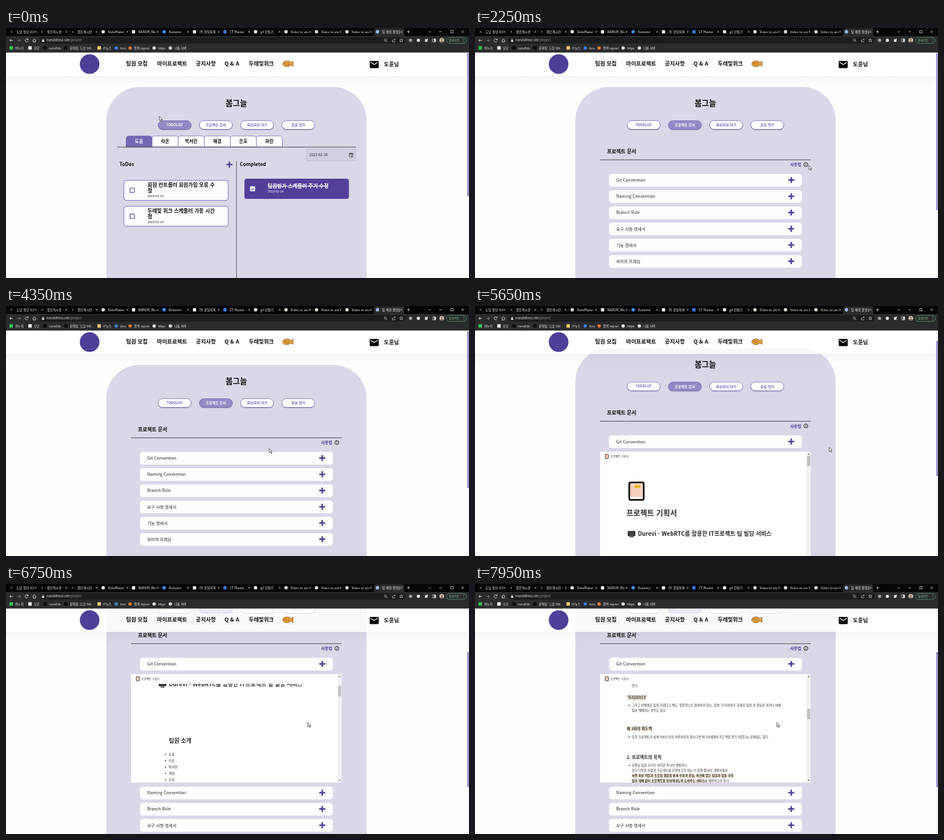
Animation, 800 px wide and 433 px high, one loop 8000 ms. Source, as an HTML page:

```html
<!DOCTYPE html>
<html lang="ko">
<head>
<meta charset="utf-8">
<title>두레빛</title>
<style>
  html, body { margin: 0; width: 100%; height: 100%; overflow: hidden; background: #fefefe; }
  svg { display: block; width: 100%; height: 100%; }
  text { font-family: 'Noto Sans CJK KR', 'Noto Sans CJK', 'Noto Sans', sans-serif; white-space: pre; }
</style>
</head>
<body>
<svg id="stage" viewBox="0 0 800 433" xmlns="http://www.w3.org/2000/svg"></svg>
<script>
const LOOP = 8000;
const PURPLE = '#503f99', EDGE = '#7766b8', INK = '#0c0c0c', DOC = '#2b2926';
const stage = document.getElementById('stage');

// Markup helpers; text y is the optical centre of the line
const text = (x, y, s, size, fill = INK, weight = 700, more = '') =>
  `<text x="${x}" y="${(y + size * 0.37).toFixed(2)}" font-size="${size}" fill="${fill}" font-weight="${weight}" ${more}>${s}</text>`;
const mid = (x, y, s, size, fill, weight) => text(x, y, s, size, fill, weight, 'text-anchor="middle"');
const rect = (x, y, w, h, fill, r = 0, more = '') =>
  `<rect x="${x}" y="${y}" width="${w}" height="${h}" rx="${r}" fill="${fill}" ${more}/>`;
const dot = (x, y, r, fill, more = '') => `<circle cx="${x}" cy="${y}" r="${r}" fill="${fill}" ${more}/>`;
const line = (d, stroke, w = 1, more = '') => `<path d="${d}" fill="none" stroke="${stroke}" stroke-width="${w}" ${more}/>`;
const group = (id, body, more = '') => `<g id="${id}" ${more}>${body}</g>`;
const plus = (x, y, r, w) => line(`M${x - r} ${y}h${2 * r}M${x} ${y - r}v${2 * r}`, PURPLE, w);
const mark = s => `<tspan class="hl" font-weight="700">${s}</tspan>`;

function pill(x, label, on) {
  return rect(x - 28.5, 160.5, 57, 15, on ? '#9688c6' : '#fff', 7.5, `stroke="${EDGE}" stroke-width=".8" filter="url(#soft)"`) +
    mid(x, 168, label, label === 'TODOLIST' ? 5.7 : 6, on ? '#fff' : '#7465b3', 700);
}

function pills(active) {
  return ['TODOLIST', '프로젝트 문서', '화상회의 하기', '동료 평가']
    .map((s, i) => pill(291.5 + i * 71.2, s, i === active)).join('');
}

function todoCard(y, first) {
  return rect(203.7, y, 180.3, 34.5, '#fdfcff', 4, `stroke="${EDGE}"`) +
    rect(214.3, y + 13.3, 7.6, 7.6, 'none', 1, `stroke="${PURPLE}" stroke-width="1.1"`) +
    text(244.5, y + 8, first, 8.9) + text(244.5, y + 17.6, '정', 8.9) +
    text(244.5, y + 27.3, '2023-02-24', 5.4, '#222', 500);
}

function todoView() {
  const tabs = ['도윤', '라온', '박서한', '재겸', '은호', '하린'].map((s, i) => {
    const x = 207.5 + i * 45;
    return `<path d="M${x} 206v-14q0-5 5-5h35q5 0 5 5v14z" fill="${i ? '#fff' : '#7767b4'}" stroke="${EDGE}" stroke-width=".8"/>` +
      mid(x + 22.5, 196, s, 7.8, i ? INK : '#fff');
  }).join('');
  return pills(0) + tabs + line('M192 206.2H605', '#333', .9) +
    rect(519.5, 210, 84.5, 20, '#d3cee2', 0, 'stroke="#b7b1c8" stroke-width=".8"') +
    text(524, 220, '2023-02-24', 6.2, '#222', 500) +
    rect(593, 217.3, 6.4, 6, 'none', .6, 'stroke="#444" stroke-width=".9"') +
    line('M593 218.5h6.4M594.6 216v2M597.8 216v2', '#444', 1) + rect(596.3, 220.6, 2, 1.8, '#444') +
    text(196, 235.5, 'ToDos', 8.4) + plus(386, 236.5, 5.2, 2.4) +
    line('M398.3 230.5V433', '#444', .9) + text(404, 235.5, 'Completed', 8.4) +
    todoCard(264, '회원 컨트롤러 회원가입 오류 수') + todoCard(308.8, '두레빛 위크 스케줄러 가동 시간') +
    rect(412, 261, 180.5, 35, '#543f99', 4) + rect(421.8, 274.2, 8.6, 8.6, '#fff', 1) +
    line('M423.8 278.6l1.8 1.8 3.2-3.6', '#543f99', 1.1) +
    text(452, 273.3, '팀원평가 스케줄러 주기 수정', 8.9, '#fff') + line('M452 274H556', '#fff', 1) +
    text(452, 283.2, '2023-02-24', 5.4, '#fff', 500);
}

const row = (y, s) => rect(231.5, y - .2, 333.2, 22, '#fefefe', 5) +
  text(244, y + 10.6, s, 7.2, '#222', 500) + plus(546.4, y + 10.4, 5.2, 2.6);

// Document inside the opened row, laid out for the page scrolled by 125
function documentBody() {
  const para = (y0, gap, size, x, rows) => rows.map((s, i) => text(x, y0 + i * gap, s, size, DOC, 500)).join('');
  const bullet = (y, s, size = 5.3) => dot(266.5, y, 1, DOC) + text(271, y, s, size, DOC, 500);
  const team = ['도윤', '라온', '박서한', '재겸', '은호', '한서율'].map((s, i) =>
    dot(275.5, 420 + i * 11, 1, DOC) + text(281, 420 + i * 11, s, 5.6, DOC, 500)).join('');
  const book = rect(266.5, 209.3, 25, 30.2, '#f6d3c0', 2.5, 'stroke="#101010" stroke-width="2.9"') +
    line('M270.3 211v24', '#e3b7a2', 1.4) + rect(268, 234.5, 22, 3.3, '#fff') + rect(275.5, 214, 10, 5, '#e9b51c', 1);
  const screen = rect(264, 293.5, 13, 8.6, '#222', .8) + rect(265.4, 294.9, 10.2, 5.6, '#444') + rect(267, 302.8, 7, 1.4, '#222');
  const badge = `<path d="M264 506l5-4 8 3-1 4-5 3-7-3z" fill="#222"/>` + dot(270, 506, 1.8, '#3aa66a') + rect(272, 507, 3, 2, '#e9c62c');
  return book + text(261.5, 261.8, '프로젝트 기획서', 13, DOC) +
    screen + text(281.5, 298.3, 'Durevi - WebRTC를 활용한 IT프로젝트 팀 빌딩 서비스', 9.85, DOC) +
    text(281.5, 396, '팀원 소개', 9.8, DOC) + team +
    badge + text(281.5, 506.5, '기획의도와 목적', 9.8, DOC) +
    rect(261.5, 528, 1.2, 100, DOC) +
    para(533.5, 10.82, 6.35, 269, [
      'AI와 메타버스 등, 나날이 발전하는 4차 산업 기술로 인해 프로그래밍과 IT업계에 대한 관심이 증',
      '가하고 있다.',
      '이에 따라 주니어 개발자와 SW역량을 쌓고자 하는 타 분야 종사자들 또한 늘어나는 추세다.',
      '개발자에게는 탄탄한 이론도 필요하지만, 프로젝트 경험도 그에 못지 않게 중요하다는 것은 너무나',
      '자명한 사실이다.',
      '다만 ' + mark('혼자 할 수 있는 이론 공부와 달리 여러 사람이 진행하는 프로젝트는 시작 전부터 많은 문제'),
      mark('점에 봉착') + '한다.',
      '우리는 이러한 문제들을 해결하여 ' + mark('보다 간편하고 프로젝트 진행을 도와줄 IT프로젝트 팀 빌딩 서비'),
      mark('스') + '를 제작하고자 한다.']) +
    text(262, 649, '1. 프로젝트의 배경', 7.6, DOC) +
    bullet(667, '주니어 개발자는 함께할 팀원을 찾는 것부터 어려움을 겪는 경우가') + text(271, 676.3, '많다.', 5.3, DOC, 500) +
    text(262, 697, mark("'프리라이더'"), 6.6, DOC) +
    bullet(710.3, "그리고 어떻게든 팀을 꾸렸다고 해도, 열정적으로 참여하지 않는, 일명 '프리라이더' 문제로 팀원 간 갈등을 겪거나 아예") +
    text(271, 719.3, '팀이 해체되는 경우도 있다.', 5.3, DOC, 500) +
    text(262, 751, mark('제 3자의 피드백'), 6.6, DOC) +
    bullet(765, '또한 프로젝트가 실제 서비스까지 이루어지지 않는다면 제 3자에게서 피드백을 받기 어렵다는 문제점도 있다.') +
    text(262, 800, '2. 프로젝트의 목적', 7.6, DOC) + dot(266.5, 814.3, 1, DOC) +
    para(814.3, 9, 5.3, 271, [
      '이렇듯 팀을 꾸리기 어려운 주니어 개발자나,',
      '보다 다양한 사람과 프로젝트를 진행하고자 하는 IT 업계 종사자, 개발자들이',
      mark('사전 화상 미팅과 프로필 열람을 통해 수준과 관심, 여건에 맞는 팀원과 팀을 꾸려'),
      mark('팀의 해체 없이 프로젝트를 완성해내도록 도와주는 서비스') + '를 제작하고자 한다.']);
}

function embed() {
  return rect(216, 156, 364, 188, '#fff') + group('inner', documentBody()) +
    rect(216, 156, 357, 17, '#fff') + rect(225, 160.6, 5.6, 7.2, '#f3cdb9', .8, 'stroke="#222" stroke-width=".9"') +
    text(234, 164.3, '프로젝트 기획서', 4.6, DOC, 500) +
    rect(573, 156, 7, 188, '#f1f1f1') +
    '<path d="M574.8 161h3.4l-1.7-2zM574.8 339.2h3.4l-1.7 2z" fill="#555"/>' +
    rect(573.7, 163, 5.6, 18, '#c1c1c1', 0, 'id="innerThumb"');
}

function docView() {
  const later = ['Naming Convention', 'Branch Rule', '요구 사항 명세서', '기능 명세서', '와이어 프레임'];
  return pills(1) + text(228, 213.5, '프로젝트 문서', 8.7) + line('M216 228.3H580', '#333', .9) +
    text(544.5, 236.7, '사용법', 6.9, PURPLE) +
    dot(571.7, 236.5, 3.4, 'none', 'stroke="#111"') + line('M571.7 236v2.2M571.7 234.3v1', '#111', .9) +
    row(253, 'Git Convention') + group('embed', embed(), 'transform="translate(0 125)" clip-path="url(#fold)"') +
    group('later', later.map((s, i) => row(281.1 + i * 28.1, s)).join(''));
}

function header() {
  const nav = [[207.5, '팀원 모집'], [261, '마이프로젝트'], [328, '공지사항'], [377.5, 'Q &amp; A'], [419.5, '두레빛위크']];
  return rect(0, 83, 797, 20, 'url(#shade)') + rect(0, 42, 797, 41, '#fff', 0, 'opacity=".8"') +
    dot(144.5, 62.5, 17, PURPLE) + nav.map(([x, s]) => text(x, 62, s, 9.4)).join('') +
    '<path d="M478 62q1-5 8-5 5 0 6 3l4-2.500v9l-4-2.500q-2 3-7 3-6 0-7-5z" fill="#e3a03c" stroke="#8a561c" stroke-width=".8"/>' +
    line('M483.500 58.500q2 3.500 0 7M486.500 61h3M486.500 63.500h3', '#8a561c', .7) + dot(481, 61, .7, '#4a2b0c') +
    rect(628.5, 57, 15.5, 12.5, '#000', 1.4) + line('M630 59.300l6.200 4 6.200-4', '#fff', 1.3) +
    text(653, 62.5, '도윤님', 9.4);
}

function chrome() {
  const G = '#dcdee1', BAR = '#2a2b2d';
  const titles = ['도담 청년 아카', '열린게시판 -', '열린게시판 -', 'SlideMaker', 'NARUM_We', 'Kodamir', '(9) 할일목록', 'CT Master',
    'gif 만들기', 'Video to ani', 'Video to ani', 'Video to ani', '팀 매칭 플랫폼'];
  const icons = ['#111', '#111', '#111', '#ddd', '#eee', '#3f8cf0', '#eee', '#3a78e0', '#e8eaed', '#d5d9d6', '#d5d9d6', '#d5d9d6', '#9fb8ea'];
  const tabs = titles.map((s, i) => {
    const x = 7 + i * 52.65, cx = x + 44.5, square = [0, 1, 2, 4, 6, 7].includes(i);
    return (square ? rect(x, 3.8, 5.6, 5.6, icons[i], .8) : dot(x + 3, 6.6, 3, icons[i])) +
      (i < 3 ? rect(x + 2.4, 5.4, .9, 2.4, '#ddd') : '') +
      `<svg x="${x + 11}" y="0" width="31" height="14">${text(0, 6.8, s, 5.5, '#f0f1f3', 500)}</svg>` +
      line(`M${cx - 1.6} 5l3.200 3.200m0-3.200l-3.200 3.200`, G, .7) +
      (i < 11 ? line(`M${x + 49} 4v6`, '#44464a', .5) : '');
  }).join('');
  const marks = [[9, '#2cc653', '하누리'], [41.5, '#eee', '모단'], [67.5, '#0b0b0b', 'naruEdu'], [103.5, '#0b0b0b', '문제집: 도담 SW...'],
    [161, '#f2cf73', 'IT뉴스'], [190.5, '#3b82f0', 'toru'], [214.5, '#ef7c35', '플젝 repovi'], [256, '#dfe1e5', 'https'], [284, '#dfe1e5', '나룸 서버']];
  const bookmarks = marks.map(([x, c, s], i) => (i < 5 ? rect(x - 3, 31.6, 6, 6, c, .8) : dot(x, 34.6, 2.9, c)) +
    text(x + 6.7, 34.6, s, 5.3, '#f0f1f3', 500)).join('');
  return rect(0, 0, 800, 14.5, '#050505') + rect(0, 14, 800, 28.5, BAR) +
    `<path d="M633 14.500q3 0 3-3v-8q0-3 3-3h46q3 0 3 3v8q0 3 3 3z" fill="${BAR}"/>` + tabs +
    line('M695.500 3.800v5.400M692.800 6.500h5.400', G, .8) +
    line('M730 5.500l2 2 2-2M749 6.500h4M768.500 4.500h4v4h-4zM787 4.500l4 4m0-4l-4 4', G, .8) +
    line('M12 21.500h-5.500m2.500-2.500l-2.500 2.500 2.500 2.500', G, .9) + line('M19.500 21.500h5.500m-2.500-2.500l2.500 2.500-2.500 2.500', '#85878b', .9) +
    line('M38 20a2.700 2.700 0 1 0 .2 2.600M38.300 18.300v2h-2', G, .9) + line('M46 21.500l3-2.700 3 2.700M47 21v3.200h4V21', G, .9) +
    rect(57.5, 16, 633, 11, '#1b1c1e', 5.5) +
    rect(62.2, 20.8, 3.8, 3.2, G, .4) + line('M63 20.800v-1a1.100 1.100 0 0 1 2.200 0v1', G, .7) +
    text(70, 21.4, 'narubitteul.site<tspan fill="#9aa0a6">/project</tspan>', 5.6, '#e8eaed', 400) +
    dot(655.5, 20.8, 1.9, 'none', `stroke="${G}" stroke-width=".7"`) + line('M657 22.300l1.800 1.800', G, .8) +
    line('M667.500 20.500v3.500h4.500v-1.500M669 22q.5-2.500 3.500-2.500m-1.200-1.300l1.300 1.300-1.300 1.300', G, .7) +
    line('M683 18.300l.9 2 2.100.2-1.600 1.400.5 2.100-1.900-1.100-1.900 1.100.5-2.100-1.600-1.400 2.100-.2z', G, .7) +
    dot(699, 21.3, 2.8, '#9da3a5') + dot(712.5, 21.3, 2.8, '#e4e5e8') +
    rect(723.8, 19.3, 4.6, 4.6, G, .8) + dot(728, 19.3, 1.1, G) +
    rect(737, 18.8, 5.4, 5.2, 'none', .5, `stroke="${G}" stroke-width=".8"`) + rect(739.6, 18.8, 2.8, 5.2, G) +
    dot(753, 21.3, 4, '#d8cbbd') + dot(753, 20, 1.5, '#765f50') + '<path d="M750.200 24.100q2.800-4 5.600 0-2.800 2.200-5.600 0z" fill="#765f50"/>' +
    rect(761, 16.3, 34.5, 10.4, BAR, 5.2, 'stroke="#5fae78" stroke-width=".7"') + text(765, 21.4, '업데이트', 5, '#81c995', 500) +
    [18.8, 21.3, 23.8].map(y => dot(791, y, .6, '#81c995')).join('') + bookmarks;
}

stage.innerHTML = `<defs>
  <filter id="soft" x="-10%" y="-20%" width="120%" height="170%"><feDropShadow dx="0" dy="1" stdDeviation=".7" flood-color="#3a2f66" flood-opacity=".4"/></filter>
  <linearGradient id="shade" x2="0" y2="1"><stop stop-color="#000" stop-opacity=".035"/><stop offset="1" stop-color="#000" stop-opacity="0"/></linearGradient>
  <clipPath id="fold"><rect id="foldBox" x="216" y="156" width="364" height="188"/></clipPath>
  <clipPath id="docBox"><rect x="216" y="156" width="357" height="188"/></clipPath></defs>` +
  rect(0, 0, 800, 433, '#fefefe') +
  group('page', rect(173.3, 102, 449.9, 800, '#dbd6e8', 58) +
    mid(398, 130, '봄그늘', 13.4) + group('todo', todoView()) + group('docs', docView())) +
  header() + rect(797, 42, 3, 391, '#f5f5f7') + rect(797, 43.5, 2.6, 248, '#8f82c3', 1.3, 'id="thumb"') + chrome() +
  '<path id="cursor" d="M0 0v7.200l1.700-1.500 1.200 2.700 1.200-.5-1.200-2.600h2.300z" fill="#fff" stroke="#222" stroke-width=".7"/>';

const el = id => document.getElementById(id);

// Beige bands behind the emphasised runs
for (const run of document.querySelectorAll('.hl')) {
  const at = run.getStartPositionOfChar(0), size = parseFloat(run.parentNode.getAttribute('font-size'));
  run.parentNode.insertAdjacentHTML('beforebegin',
    rect(at.x, at.y - size * .98, run.getComputedTextLength(), size * 1.25, '#f8eddd'));
}

// The document scrolls under a fixed clip
const inner = el('inner'), holder = document.createElementNS(stage.namespaceURI, 'g');
holder.setAttribute('clip-path', 'url(#docBox)');
inner.replaceWith(holder);
holder.append(inner);

const smooth = k => k * k * (3 - 2 * k);
const linear = k => k;

// Value of a keyed track [time, value] at t
function track(keys, t, ease = smooth) {
  const n = keys.findIndex(k => k[0] > t);
  if (n === 0) return keys[0][1];
  if (n < 0) return keys[keys.length - 1][1];
  const [t0, a] = keys[n - 1], [t1, b] = keys[n];
  return a + (b - a) * ease((t - t0) / (t1 - t0));
}

const path = [[0, 265, 153], [450, 358, 166], [800, 358, 166], [1700, 577, 238], [2500, 577, 238], [3700, 455, 247],
  [4370, 455, 247], [4750, 540, 261], [5000, 540, 261], [5450, 612, 244.6], [5900, 612, 244.6], [6150, 525.6, 241.6], [6400, 521.6, 240]];
const pathX = path.map(p => [p[0], p[1]]), pathY = path.map(p => [p[0], p[2]]);
const pageScroll = [[5550, 0], [5650, 28.5], [5760, 50], [5870, 90], [6020, 125]];
const docScroll = [[6400, 0], [7220, 292], [7420, 292], [7920, 500]];
const unfold = [[4800, 0], [5080, 1]];

const move = (id, x, y) => el(id).setAttribute('transform', `translate(${x.toFixed(2)} ${y.toFixed(2)})`);

function draw(t) {
  const docs = t >= 650, open = track(unfold, t), scroll = track(pageScroll, t, linear), read = track(docScroll, t, linear);
  el('todo').style.display = docs ? 'none' : '';
  el('docs').style.display = docs ? '' : 'none';
  move('page', 0, -scroll);
  move('later', 0, 195 * open);
  move('inner', 0, -read);
  el('embed').style.display = open ? '' : 'none';
  el('foldBox').setAttribute('height', 188 * open);
  el('innerThumb').setAttribute('y', 163 + read * .1063);
  el('thumb').setAttribute('y', 43.5 + scroll * .595);
  el('thumb').setAttribute('height', docs ? 272 - 38 * open : 248);
  move('cursor', track(pathX, t), track(pathY, t));
}

function tick(now) {
  draw(now % LOOP);
  requestAnimationFrame(tick);
}
draw(0);
requestAnimationFrame(tick);
</script>
</body>
</html>
```
